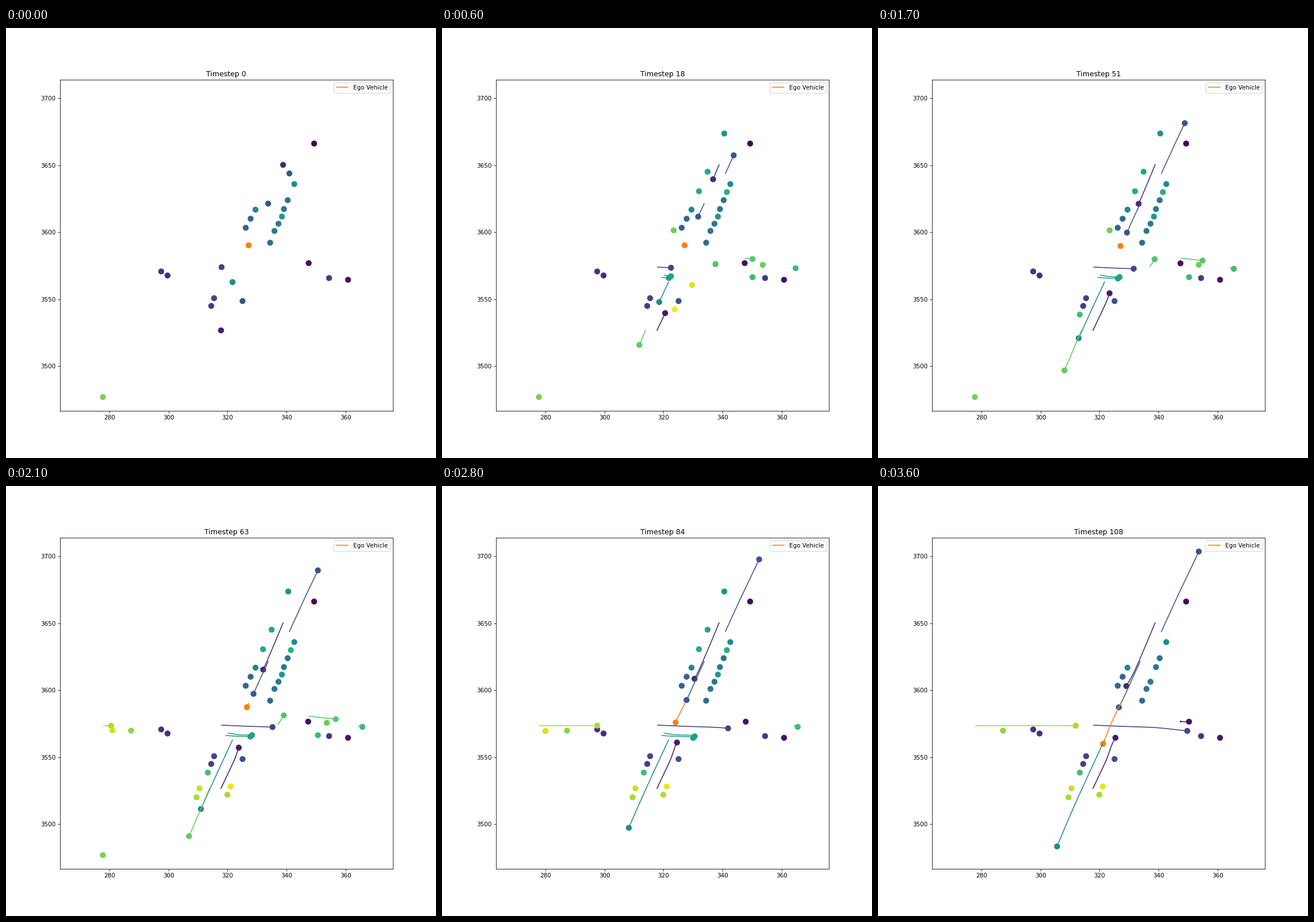
A matplotlib script for the animation above (3700 ms loop, 748 by 748 pixels).

```python
import matplotlib.pyplot as plt
import numpy as np
from matplotlib.animation import FuncAnimation

SIZE, DPI = 748, 74.8
FRAMES, STRIDE, INTERVAL = 37, 3, 100
LAST = (FRAMES - 1) * STRIDE
XLIM, YLIM = (263.2, 376.0), (3466.8, 3713.8)
EGO = "#ff7f0e"


def to_data(points):
    """Convert stage pixels (y down) to axes data units."""
    u = (points[:, 0] / SIZE - 0.125) / 0.775
    v = (0.89 - points[:, 1] / SIZE) / 0.77
    return np.column_stack([XLIM[0] + u * np.ptp(XLIM),
                            YLIM[0] + v * np.ptp(YLIM)])


def glide(points, count):
    """Monotone cubic through points that are evenly spaced in time."""
    p = np.array(points, float)
    if len(p) == 1:
        return np.repeat(p, count, axis=0)
    d = np.diff(p, axis=0)
    m = np.vstack([d[:1], np.zeros_like(d[1:]), d[-1:]])
    a, b = d[:-1], d[1:]
    same = a * b > 0
    m[1:-1][same] = 2 * a[same] * b[same] / (a[same] + b[same])
    t = np.linspace(0, len(d), count)
    i = np.minimum(t.astype(int), len(d) - 1)
    s = (t - i)[:, None]
    return ((1 + 2 * s) * (1 - s) ** 2 * p[i] + s * (1 - s) ** 2 * m[i]
            + s * s * (3 - 2 * s) * p[i + 1] + s * s * (s - 1) * m[i + 1])


class Agent:
    def __init__(self, color, points, start, last):
        self.color, self.start, self.last = color, start, last
        self.path = to_data(glide(points, last - start + 1))

    def trail(self, step):
        if not self.start <= step <= self.last:
            return self.path[:0]
        return self.path[:step - self.start + 1]


agents = []


def add(shade, *points, start=0, last=LAST):
    color = shade if isinstance(shade, str) else plt.cm.viridis(shade)
    agents.append(Agent(color, points, start, last))


def queue(shades, first, final, **span):
    """Standing cars, evenly spaced on a line."""
    for shade, spot in zip(shades, np.linspace(first, final, len(shades))):
        add(shade, spot, **span)


LONG = dict(start=1, last=99)
MID = dict(start=1, last=77)
BRIEF = dict(start=1, last=44)
LATE = dict(start=60)

# Standing
add(0.01, (536, 201))
add(0.05, (595, 438))
queue([0.15, 0.13], (270, 423.5), (281, 430.5))
add(0.17, (562, 435))
queue([0.18, 0.21], (357, 483.5), (362, 470))
add(0.25, (411.5, 475))
queue([0.32, 0.33, 0.46], (417, 347.5), (434, 316))
add(0.35, (459.5, 373.5))
queue([0.40, 0.40], (467, 353), (474, 340.5))
queue([0.41, 0.39], (483.5, 315), (490, 299.5))
add(0.48, (501.5, 271.5))
add(0.51, (491, 183.5), **LONG)
add(0.54, (480, 328), last=99)
queue([0.61, 0.60], (447, 284), (462, 250), **LONG)
add(0.63, (495.5, 285.5), **LONG)
add(0.70, (351, 498.5), start=27)
add(0.77, (558, 412), **MID)
add(0.78, (403, 352), start=1, last=62)
add(0.80, (168.5, 642), last=65)
queue([0.95, 0.99], (435, 447), (405, 489.5), **BRIEF)
add(0.83, (217.5, 425.5), **LATE)
queue([0.87, 0.92], (331.5, 541.5), (336.5, 526), **LATE)
queue([0.87, 0.97], (385, 537), (391, 522.7), **LATE)

# Driving
add(0.04, (526.5, 409), (526.5, 409), (525.5, 410), (541, 410))
add(0.07, (374, 526), (399, 472), (406.5, 451), (413, 438))
add(0.11, (482, 238), (461.5, 287), (443.5, 327.5), (432, 348))
add(0.20, (375, 416), (422.5, 418), (478, 420), (538, 426))
add(0.26, (493, 253), (521.5, 191), (547.5, 136.5), (558, 114))
add(0.27, (456, 305.5), (437, 347), (428.5, 366), (419, 385))
add(0.47, (394, 442), (362, 511), (332.5, 577), (311.5, 627))
add(0.56, (382.5, 434), (405.5, 435.5), (427, 436), (445, 441), **LONG)
add(0.57, (387, 430), (408.5, 433), (430, 433.5), (447, 438), **LONG)
add(0.69, (613, 417), (617, 418.5), (620, 419), (617, 419), **LONG)
add(0.68, (540, 433.5), (540.5, 433.5), (544, 433.5), **MID)
add(0.73, (473, 415), (485.5, 395.5), **MID)
add(0.74, (527.5, 400.5), (584, 406.7), **MID)
add(0.76, (354, 526), (330.7, 581), (311.5, 625), **MID)
add(0.87, (170, 417), (270, 416.7), (344, 417), **LATE)
add(0.93, (185, 425), (181, 425.5), (178.5, 427), (146, 427.5), start=63, last=105)
add(EGO, (422, 378), (422, 378), (421.7, 379.5), (408, 407.5), (391.5, 448.5))

fig, ax = plt.subplots(figsize=(SIZE / DPI, SIZE / DPI), dpi=DPI)
ax.set(xlim=XLIM, ylim=YLIM)
title = ax.set_title("Timestep 0")
lines = [ax.plot([], [], color=a.color, lw=1.5)[0] for a in agents]
dots = ax.scatter([], [], s=80)
lines[-1].set_label("Ego Vehicle")
ax.legend(loc="upper right")


def draw(i):
    step = i * STRIDE
    title.set_text(f"Timestep {step}")
    spots, colors = [], []
    for agent, line in zip(agents, lines):
        trail = agent.trail(step)
        line.set_data(trail[:, 0], trail[:, 1])
        if len(trail):
            spots.append(trail[-1])
            colors.append(agent.color)
    dots.set_offsets(spots)
    dots.set_color(colors)
    return [title, dots, *lines]


anim = FuncAnimation(fig, draw, frames=FRAMES, interval=INTERVAL,
                     init_func=lambda: draw(0), repeat=True, repeat_delay=0)
plt.show()
```
